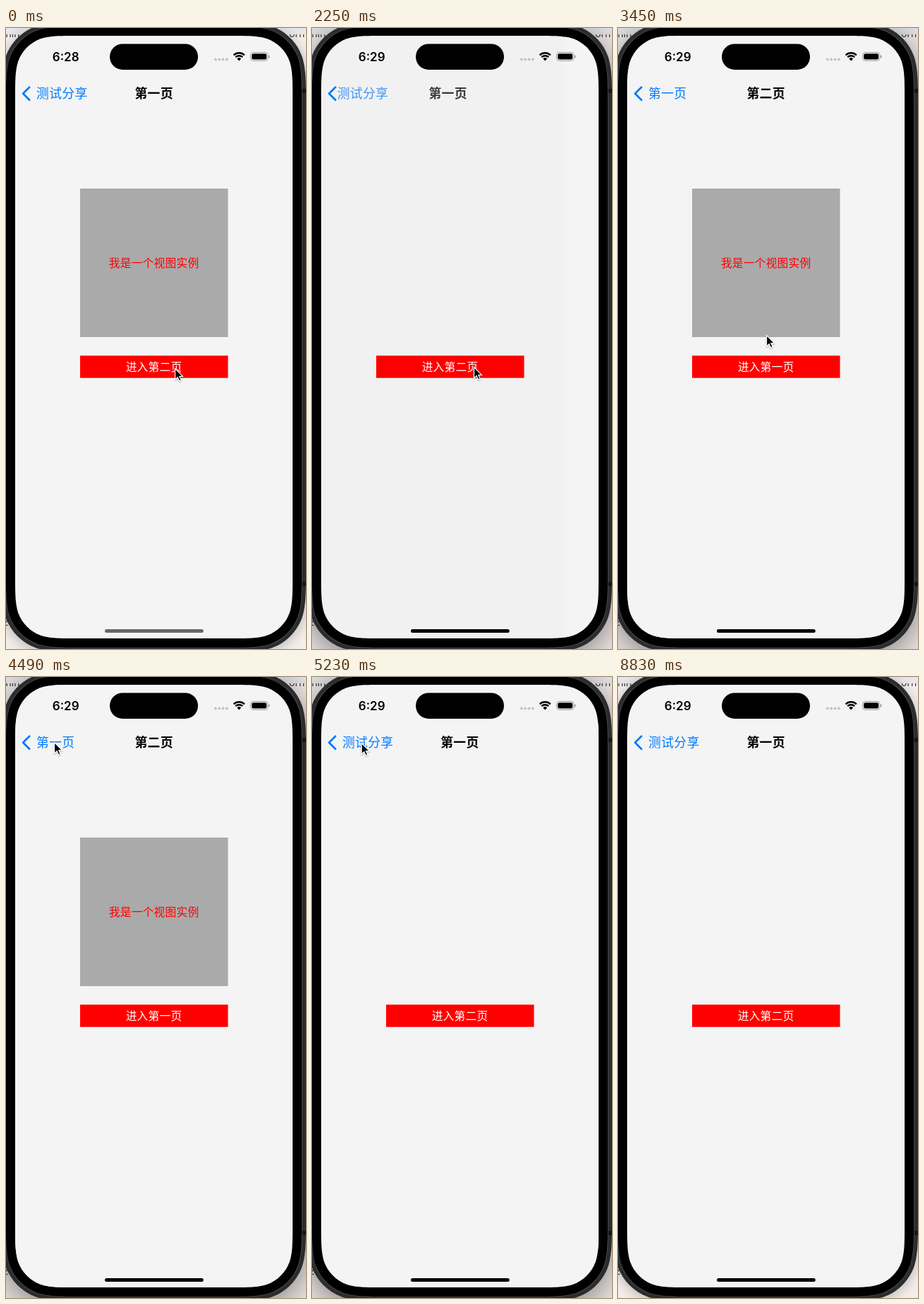
Recreate the animation shown at these times as an HTML page with a canvas. Size 425 by 878 pixels, loop 8850 ms.

```html
<!DOCTYPE html>
<html lang="zh">
<head>
<meta charset="utf-8">
<style>
html, body { margin: 0; width: 100%; height: 100%; overflow: hidden; background: #f5eeeb; }
canvas { display: block; width: 425px; height: 878px; }
</style>
</head>
<body>
<canvas id="stage" width="425" height="878"></canvas>
<script>
const ctx = document.getElementById('stage').getContext('2d');
const LOOP = 8850;
const CJK = '"Noto Sans CJK SC", "Noto Sans CJK", sans-serif';
const BLUE = '#007aff', RED = '#f00', PAGE = '#f4f4f4';
const SCREEN = { x: 13, y: 11, w: 393, h: 852, r: 57 };
const CENTER = 209.6, BACK_X = 43;

// Steps at which the hand-held events happen (one step is about 150 ms)
const MINUTE = 11, PRESS = 13, PUSH = 15, BACK_PRESS = 31, POP = 33, LEAVE = 50, BLUR = 59;

// Cursor tip: [step, x, y]
const CURSOR = [
  [0, 239, 481], [4, 229, 479], [22, 229, 479], [23, 210, 434], [25, 150, 290],
  [27, 95, 150], [30, 68, 92], [34, 68, 92], [38, 75, 96], [39, 76, 97], [41, 76, 97],
  [42, 98, 87], [43, 150, 62], [44, 209, 42], [45, 262, 0], [46, 279, 180],
  [47, 278, 470], [48, 272, 681], [49, 316, 770]
];

const clamp = v => Math.max(0, Math.min(1, v));
const spring = x => (1 + x) * Math.exp(-x);

function stepAt(t) {
  const lead = t < 3590 ? 0 : t < 5080 ? 10 : 20;
  return Math.floor((t + lead) / 150);
}

// How far page two is from its place: 0 = in place, 1 = off to the right
function slideAt(step) {
  if (step < PUSH) return 1;
  if (step < POP) return step < PUSH + 4 ? spring(0.6 + 4.1 * (step - PUSH)) : 0;
  return step < POP + 3 ? 1 - spring(0.325 + 4.1 * (step - POP)) : 1;
}

function cursorAt(step) {
  const i = CURSOR.findIndex(k => k[0] >= step);
  const [s1, x1, y1] = CURSOR[i];
  if (s1 === step) return [x1, y1];
  const [s0, x0, y0] = CURSOR[i - 1];
  const u = (step - s0) / (s1 - s0);
  return [x0 + (x1 - x0) * u, y0 + (y1 - y0) * u];
}

function rect(color, x, y, w, h, r = 0) {
  ctx.fillStyle = color;
  ctx.beginPath();
  ctx.roundRect(x, y, w, h, r);
  ctx.fill();
}

function text(str, x, y, { size = 17.8, weight = 400, color = '#000', alpha = 1, align = 'left', spacing = 0.35, font = CJK } = {}) {
  if (alpha <= 0) return;
  ctx.save();
  ctx.globalAlpha *= alpha;
  ctx.font = `${weight} ${size}px ${font}`;
  ctx.letterSpacing = spacing + 'px';
  ctx.fillStyle = color;
  ctx.textAlign = align;
  ctx.fillText(str, x, y);
  ctx.restore();
}

// Screen outline grown by d: each corner is a round arc eased into the sides
function outline(d) {
  const r = SCREEN.r + d, w = SCREEN.w + 2 * d, h = SCREEN.h + 2 * d;
  ctx.save();
  ctx.beginPath();
  ctx.translate(SCREEN.x - d, SCREEN.y - d);
  for (let side = 0; side < 4; side++) {
    const curve = (...p) => ctx.bezierCurveTo(...p.map(v => v * r));
    ctx.lineTo(0, 1.529 * r);
    curve(0, 1.088, 0, 0.868, 0.075, 0.631);
    curve(0.169, 0.373, 0.373, 0.169, 0.631, 0.075);
    curve(0.868, 0, 1.088, 0, 1.529, 0);
    ctx.translate(side % 2 ? h : w, 0);
    ctx.rotate(Math.PI / 2);
  }
  ctx.closePath();
  ctx.restore();
}

function drawBody(active) {
  rect('#f5eeeb', 0, 0, 425, 878);
  const scrap = { size: 14, color: '#333', spacing: 0, font: 'Inter, sans-serif' };
  text('thin', -5, 13, scrap);
  text('orn', 401, 13, scrap);
  text('2', -5, 845, scrap);
  rect('#e6e7ea', 0, 0, 425, 9);
  ctx.save();
  ctx.shadowColor = active ? 'rgba(0,0,0,.5)' : 'rgba(0,0,0,.25)';
  ctx.shadowBlur = active ? 50 : 18;
  ctx.shadowOffsetY = active ? 10 : 3;
  ctx.fillStyle = '#2b2c2e';
  outline(19);
  ctx.fill();
  ctx.restore();
  rect('#151515', 419, 86, 6, 6);
  rect('#151515', 419, 783, 6, 6);
  outline(13);
  ctx.strokeStyle = '#515254';
  ctx.lineWidth = 1.5;
  ctx.stroke();
  ctx.fillStyle = '#000';
  ctx.fill();
}

function drawPage(dx, label, hasView, labelAlpha) {
  ctx.save();
  ctx.translate(Math.round(dx), 0);
  rect(PAGE, SCREEN.x, SCREEN.y, SCREEN.w, SCREEN.h);
  const small = { size: 15.7, align: 'center', spacing: 0.3 };
  if (hasView) {
    rect('#aaa', 105, 227, 209.5, 210);
    text('我是一个视图实例', CENTER, 337.7, { ...small, color: RED });
  }
  rect(RED, 105, 463.3, 209.5, 31.4);
  text(label, CENTER, 484.7, { ...small, color: '#fff', alpha: labelAlpha });
  ctx.restore();
}

function drawNavBar(step, slide) {
  const shown = 1 - slide;
  const inAlpha = clamp(1 - 2 * slide), outAlpha = clamp(1 - 2 * shown);
  const pressed = step >= BACK_PRESS && step <= POP;
  const title = { weight: 700, align: 'center' };
  const back = { color: BLUE };

  text('第一页', CENTER - shown * 139, 99.2, { ...title, alpha: outAlpha });
  text('第二页', CENTER + slide * 174, 99.2, { ...title, alpha: inAlpha });
  text('测试分享', BACK_X - shown * 60, 99.2, { ...back, alpha: outAlpha });
  text('第一页', BACK_X + slide * 130, 99.2, { ...back, alpha: inAlpha * (pressed ? 0.22 : 1) });

  ctx.save();
  ctx.globalAlpha = pressed ? (step === POP ? 0.5 : 0.22) : 1;
  ctx.strokeStyle = BLUE;
  ctx.lineWidth = 2.7;
  ctx.lineCap = ctx.lineJoin = 'round';
  ctx.beginPath();
  ctx.moveTo(33.2, 83.8);
  ctx.lineTo(24.2, 92.8);
  ctx.lineTo(33.2, 101.8);
  ctx.stroke();
  ctx.restore();
}

function drawStatusBar(step) {
  text(step < MINUTE ? '6:28' : '6:29', 84.7, 46.5,
    { size: 17, weight: 600, align: 'center', spacing: 0, font: 'Inter, sans-serif' });
  rect('#000', 147, 22.4, 125, 36.6, 18.3);
  for (let i = 0; i < 4; i++) rect('#c3c3c3', 295 + i * 5.3, 42.5, 3.8, 3.8, 1.9);

  const from = -Math.PI * 0.74, to = -Math.PI * 0.26;
  ctx.strokeStyle = ctx.fillStyle = '#000';
  ctx.lineWidth = 2.4;
  for (const r of [11.2, 7.3]) {
    ctx.beginPath();
    ctx.arc(330.2, 46.5, r, from, to);
    ctx.stroke();
  }
  ctx.beginPath();
  ctx.moveTo(330.2, 46.5);
  ctx.arc(330.2, 46.5, 4.2, from, to);
  ctx.fill();

  ctx.strokeStyle = '#9a9a9a';
  ctx.lineWidth = 1;
  ctx.beginPath();
  ctx.roundRect(346.5, 34.5, 24.5, 11.8, 3.8);
  ctx.stroke();
  rect('#000', 348.2, 36.2, 21, 8.4, 2.4);
  rect('#9a9a9a', 372, 38.4, 1.4, 4, 0.7);
}

function drawCursor(x, y) {
  ctx.save();
  ctx.translate(x + 0.5, y + 0.5);
  ctx.beginPath();
  [[0, 0], [0, 15.5], [3.6, 12.2], [6, 17.6], [8.6, 16.5], [6.3, 11.2], [11, 11.2]]
    .forEach(p => ctx.lineTo(...p));
  ctx.closePath();
  ctx.fillStyle = '#000';
  ctx.fill();
  ctx.shadowColor = 'rgba(0,0,0,.35)';
  ctx.shadowBlur = 2;
  ctx.shadowOffsetY = 1;
  ctx.strokeStyle = '#fff';
  ctx.lineWidth = 1.2;
  ctx.stroke();
  ctx.restore();
}

function draw(t) {
  const step = stepAt(t), slide = slideAt(step), shown = 1 - slide;
  drawBody(step >= PRESS && step < BLUR);

  ctx.save();
  outline(0);
  ctx.clip();
  const pressAlpha = step === PRESS || step === PRESS + 1 ? 0.2 : 1;
  drawPage(-0.3 * SCREEN.w * shown, '进入第二页', step < PUSH, pressAlpha);
  if (shown > 0) {
    rect(`rgba(0,0,0,${0.1 * shown})`, SCREEN.x, SCREEN.y, SCREEN.w, SCREEN.h);
    drawPage(SCREEN.w * slide, '进入第一页', true, 1);
  }
  drawNavBar(step, slide);
  drawStatusBar(step);
  rect(step < PUSH ? '#666' : '#000', 140, 850, 139.7, 5, 2.5);
  ctx.restore();

  if (step < LEAVE) drawCursor(...cursorAt(step));
}

function tick(now) {
  draw(now % LOOP);
  requestAnimationFrame(tick);
}
draw(0);
requestAnimationFrame(tick);
</script>
</body>
</html>
```
